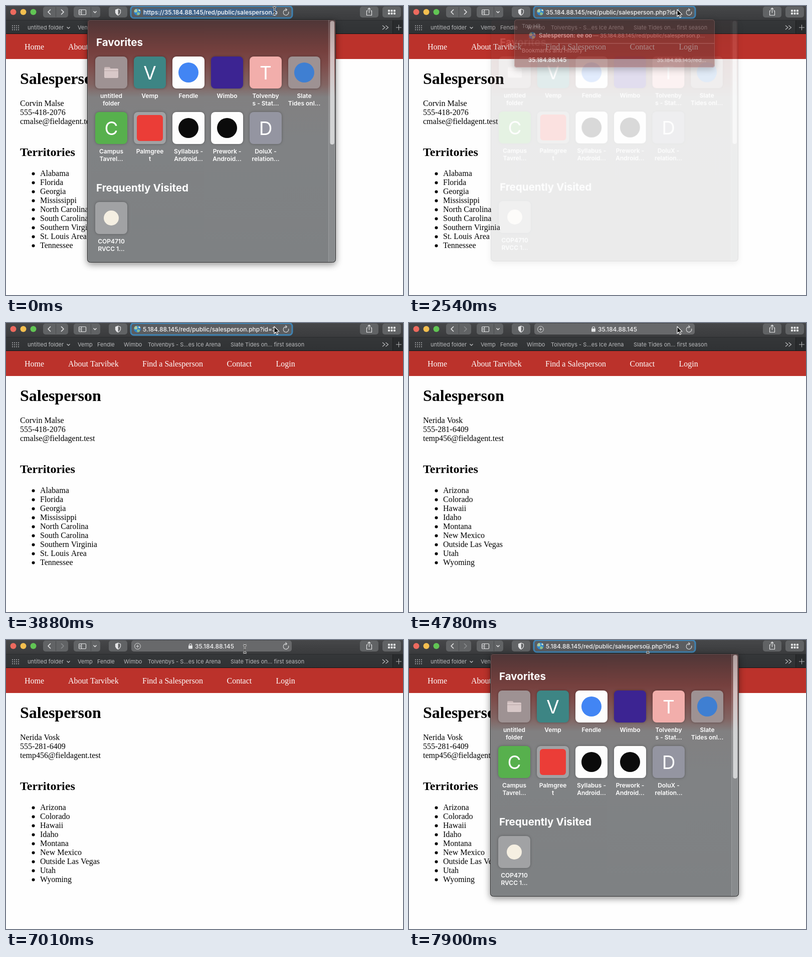
An HTML page with a canvas for the animation above (8 s loop, 792 by 578 pixels).

```html
<!DOCTYPE html>
<html lang="en">
<head>
<meta charset="utf-8">
<title>Salesperson</title>
<style>
html, body { margin: 0; width: 100%; height: 100%; overflow: hidden; background: #fefefe; }
canvas { display: block; }
</style>
</head>
<body>
<canvas id="stage" width="792" height="578"></canvas>
<script>
const W = 792, H = 578, LOOP = 8000;
const SANS = 'Inter, "Liberation Sans", sans-serif';
const SERIF = '"Liberation Serif", "Noto Serif", serif';
const screen = document.getElementById('stage').getContext('2d');
let g = screen;

// Value of the last [time, value] pair reached.
const at = (t, pairs) => pairs.reduce((v, p) => (t >= p[0] ? p[1] : v), pairs[0][1]);

function text(s, x, y, font, color, align = 'left') {
  g.font = font;
  g.fillStyle = color;
  g.textAlign = align;
  g.fillText(s, x, y);
}

const sans = (s, x, y, size, color, weight = 400, align) =>
  text(s, x, y, `${weight} ${size}px ${SANS}`, color, align);

const serif = (s, x, y, color = '#000', size = 16, weight = 400) =>
  text(s, x, y, `${weight} ${size}px ${SERIF}`, color);

function rect(x, y, w, h, color) {
  g.fillStyle = color;
  g.fillRect(x, y, w, h);
}

function box(x, y, w, h, r, fill, stroke, line = 1) {
  g.beginPath();
  g.roundRect(x, y, w, h, r);
  if (fill) { g.fillStyle = fill; g.fill(); }
  if (stroke) { g.strokeStyle = stroke; g.lineWidth = line; g.stroke(); }
}

function disc(x, y, r, color) {
  g.beginPath();
  g.arc(x, y, r, 0, 7);
  g.fillStyle = color;
  g.fill();
}

function path(points, color, line = 1.3, fill) {
  g.beginPath();
  points.forEach(([x, y], i) => (i ? g.lineTo(x, y) : g.moveTo(x, y)));
  if (fill) { g.closePath(); g.fillStyle = fill; g.fill(); }
  g.strokeStyle = color;
  g.lineWidth = line;
  g.stroke();
}

function fade(y0, y1, ...stops) {
  const f = g.createLinearGradient(0, y0, 0, y1);
  stops.forEach(([p, c]) => f.addColorStop(p, c));
  return f;
}

function layer(draw) {
  const c = document.createElement('canvas');
  c.width = W;
  c.height = H;
  g = c.getContext('2d');
  draw();
  g = screen;
  return c;
}

function shadowBox(x, y, w, h, r, fill) {
  g.save();
  g.shadowColor = 'rgba(0,0,0,.45)';
  g.shadowBlur = 14;
  g.shadowOffsetY = 4;
  box(x, y, w, h, r, fill);
  g.restore();
}

function globe(x, y, r) {
  g.save();
  g.beginPath();
  g.arc(x, y, r, 0, 7);
  g.clip();
  disc(x, y, r, '#2f86cf');
  disc(x - r * .45, y - r * .35, r * .5, '#a9c9a0');
  disc(x + r * .3, y + r * .5, r * .42, '#8dbb8c');
  disc(x + r * .6, y - r * .5, r * .3, '#c4dccb');
  g.restore();
}

function tile(col, y, color, lines, mark) {
  const x = 178 + 77 * col, cx = x + 32, cy = y + 32;
  g.save();
  g.shadowColor = 'rgba(0,0,0,.3)';
  g.shadowBlur = 5;
  box(x, y, 64, 64, 8, color);
  g.restore();
  if (typeof mark === 'string') sans(mark, cx, cy + 14, 37, '#fff', 400, 'center');
  else if (mark) mark(cx, cy);
  lines.forEach((s, i) => sans(s, cx, y + 83 + 15 * i, 12, '#fff', 600, 'center'));
}

function folder(x, y) {
  box(x - 14, y - 11, 12, 8, 2, '#c9b7b7');
  box(x - 14, y - 8, 28, 19, 2, '#d8c8c8');
  rect(x - 14, y - 4, 28, 1, '#b9a6a6');
}

const dot = (color, r = 20) => (x, y) => disc(x, y, r, color);

const favorites = layer(() => {
  shadowBox(162, 27, 496, 486, 6, '#808284');
  box(162, 27, 496, 486, 6, fade(27, 513,
    [0, '#4e3637'], [.07, '#643b3a'], [.13, '#75403e'], [.18, '#7d4a48'],
    [.27, '#826563'], [.32, '#818081'], [.5, '#808284'], [1, '#7e8183']));
  rect(643, 28, 14, 484, 'rgba(255,255,255,.08)');
  rect(643, 28, 1, 484, 'rgba(255,255,255,.16)');
  box(646.5, 30, 8.5, 247, 4, fade(30, 277, [0, '#b3a2a2'], [.3, '#d3bfbf'], [.6, '#d2d3d4'], [1, '#d4d5d6']));
  box(162.5, 27.5, 495, 485, 6, null, '#202122');
  box(163.5, 28.5, 493, 483, 5, null, 'rgba(255,255,255,.14)');

  sans('Favorites', 180, 80, 20.6, '#fff', 700);
  tile(0, 101, '#9e9293', ['untitled', 'folder'], folder);
  tile(1, 101, '#3d8584', ['Vemp'], 'V');
  tile(2, 101, '#fdfdfd', ['Fendle'], dot('#4285f4'));
  tile(3, 101, '#3c2492', ['Wimbo']);
  tile(4, 101, '#f2aeab', ['Tolvenby', 's - Stat...'], 'T');
  tile(5, 101, '#9e9293', ['Slate', 'Tides onl...'], dot('#3f7fd2'));
  tile(0, 212, '#57b04d', ['Campus', 'Tavrel...'], 'C');
  tile(1, 212, '#a1a2a4', ['Palmgree', 't'], (x, y) => box(x - 26, y - 26, 52, 52, 6, '#eb3d37'));
  tile(2, 212, '#fdfdfd', ['Syllabus -', 'Android...'], dot('#0b0b0b'));
  tile(3, 212, '#fdfdfd', ['Prework -', 'Android...'], dot('#0b0b0b'));
  tile(4, 212, '#9495a1', ['DoluX -', 'relation...'], 'D');
  sans('Frequently Visited', 180, 371, 20.6, '#fff', 700);
  tile(0, 392, '#a1a2a4', ['COP4710', 'RVCC 1...'], dot('#f5efe2', 15));
});

const hits = layer(() => {
  const pale = '#d0b7b6';
  shadowBox(210, 27, 400, 96, 5, '#703c3a');
  box(210, 27, 400, 96, 5, fade(27, 123, [0, '#593635'], [.35, '#6b3a38'], [1, '#803f3c']));
  box(210.5, 27.5, 399, 95, 5, null, '#a27270');
  rect(211, 74, 398, 1.5, '#a27c7a');
  sans('Top Hit', 225, 44, 11, pale);
  globe(246, 59, 7);
  sans('Salesperson: ee oo', 259, 63, 11.5, '#fff', 600);
  sans('— 35.184.88.145/red/public/salesperson.p...', 590, 63, 10.8, pale, 400, 'right');
  sans('Bookmarks and History', 225, 93, 11, pale);
  sans('35.184.88.145', 238, 112, 11.5, '#fff', 600);
  sans('35.184.88.145/red...', 593, 112, 10.8, pale, 400, 'right');
});

const people = [
  {
    info: ['Corvin Malse', '555-418-2076', 'cmalse@fieldagent.test'],
    areas: ['Alabama', 'Florida', 'Georgia', 'Mississippi', 'North Carolina',
      'South Carolina', 'Southern Virginia', 'St. Louis Area', 'Tennessee']
  },
  {
    info: ['Nerida Vosk', '555-281-6409', 'temp456@fieldagent.test'],
    areas: ['Arizona', 'Colorado', 'Hawaii', 'Idaho', 'Montana',
      'New Mexico', 'Outside Las Vegas', 'Utah', 'Wyoming']
  }
];

function page({ info, areas }) {
  rect(0, 56, W, H - 56, '#fefefe');
  rect(0, 56, W, 50, '#bb322b');
  [['Home', 37], ['About Tarvibek', 124], ['Find a Salesperson', 272], ['Contact', 440.5], ['Login', 538.5]]
    .forEach(([s, x]) => serif(s, x, 87, '#fff'));
  serif('Salesperson', 28, 156, '#000', 32, 700);
  info.forEach((s, i) => serif(s, 28, 200 + 18 * i));
  serif('Territories', 28, 300, '#000', 24, 700);
  areas.forEach((s, i) => {
    disc(54.5, 335.5 + 18 * i, 3, '#000');
    serif(s, 68, 340 + 18 * i);
  });
}

function chrome(canForward, loading) {
  const ink = '#e4e5e6', btn = '#616365';
  rect(0, 0, W, 28, fade(0, 28, [0, '#464749'], [1, '#3a3b3d']));
  rect(0, 28, W, 27, fade(28, 55, [0, '#353739'], [1, '#303234']));
  rect(0, 28, W, 1, '#2a2b2d');
  rect(0, 55, W, 1, '#151617');
  ['#ed6a5e', '#f4bf4f', '#61c554'].forEach((c, i) => disc(14.5 + 20 * i, 12, 6, c));

  [[74, 50], [135, 53], [205, 37], [706, 37], [751, 37]].forEach(([x, w]) => box(x, 1, w, 22, 5, btn));
  rect(99, 2, 1, 20, '#4a4c4e');
  rect(169, 2, 1, 20, '#4a4c4e');
  path([[89, 7], [84, 12], [89, 17]], ink, 1.6);
  path([[110, 7], [115, 12], [110, 17]], canForward ? ink : '#898b8d', 1.6);
  box(145.5, 7.5, 14, 10, 1.5, null, ink, 1.2);
  rect(150, 8, 1.2, 9, ink);
  [10, 12, 14].forEach(y => rect(147, y, 2, 1, ink));
  path([[174.5, 10.5], [177.5, 13.5], [180.5, 10.5]], ink, 1.5);

  // Shield, share and tab overview
  path([[223.5, 6], [228.5, 8], [228.5, 13], [226.5, 16.5], [223.5, 18.5], [220.5, 16.5], [218.5, 13], [218.5, 8], [223.5, 6]], ink, 1.2);
  path([[223.5, 6], [223.5, 18.5], [220.5, 16.5], [218.5, 13], [218.5, 8]], ink, .5, ink);
  const share = loading ? '#8c8e90' : ink;
  path([[722, 9.5], [719.5, 9.5], [719.5, 18.5], [729.5, 18.5], [729.5, 9.5], [727, 9.5]], share, 1.2);
  path([[724.5, 14], [724.5, 4.5]], share, 1.2);
  path([[721.5, 7], [724.5, 4], [727.5, 7]], share, 1.2);
  for (let i = 0; i < 6; i++) box(762 + 5.5 * (i % 3), i < 3 ? 7.5 : 13, 4, 4, 1, ink);

  const dim = '#b9babc';
  for (let i = 0; i < 12; i++) disc(13 + 4 * (i % 4), 39.5 + 4 * Math.floor(i / 4), 1, dim);
  [['untitled folder', 43], ['Vemp', 143], ['Fendle', 182], ['Wimbo', 235],
    ['Tolvenbys - S...es Ice Arena', 283], ['Slate Tides on... first season', 448]]
    .forEach(([s, x]) => sans(s, x, 47, 11, dim));
  path([[121.5, 42], [124.5, 45], [127.5, 42]], dim, 1.4);
  [751, 757.5].forEach(x => path([[x, 39], [x + 5, 43], [x, 47]], dim, 1.3));
  rect(771, 29, 21, 26, '#292b2d');
  rect(771, 29, 1, 26, '#1d1e1f');
  path([[778, 43], [789, 43]], dim, 1);
  path([[783.5, 37.5], [783.5, 48.5]], dim, 1);
}

function reload(loading) {
  if (loading) {
    path([[554.5, 8], [562.5, 16]], '#d8d9da');
    path([[562.5, 8], [554.5, 16]], '#d8d9da');
    return;
  }
  g.beginPath();
  g.arc(558.5, 13, 5.3, -.3, 4.9);
  g.strokeStyle = '#d8d9da';
  g.lineWidth = 1.2;
  g.stroke();
  path([[557.5, 4.8], [560.5, 7.6], [557.5, 10.2]], '#d8d9da', 1.2);
}

const HOST = '35.184.88.145', PATH = HOST + '/red/public/salesperson.';

function address(t, mode, hover, loading) {
  const ring = mode === 'plain' ? 0 : at(t, [[0, 1], [7160, 0], [7310, .6], [7460, 1]]);
  box(250, 1, 320, 22, 5, mode === 'plain' ? '#68696b' : '#5b5d60');
  if (ring) {
    g.globalAlpha = ring;
    box(249, 0.5, 322, 23.5, 6, null, '#3f83b3', 3);
    g.globalAlpha = 1;
  }
  reload(loading);
  if (mode === 'plain') {
    sans(HOST, 377, 17, 12, '#f2f2f3', 500);
    box(364, 11, 8, 6.5, 1, '#e4e5e6');
    box(365.5, 7.5, 5, 6, 2.5, null, '#e4e5e6', 1.2);
    if (hover) {
      g.beginPath();
      g.arc(262.5, 12.5, 6, 0, 7);
      g.strokeStyle = '#d8d9da';
      g.lineWidth = 1;
      g.stroke();
      path([[259.5, 12.5], [265.5, 12.5]], '#d8d9da', 1);
      path([[262.5, 9.5], [262.5, 15.5]], '#d8d9da', 1);
    }
    return;
  }
  globe(262, 12, 5 + 2 * ring);
  g.save();
  g.beginPath();
  g.rect(272, 2, 269, 20);
  g.clip();
  if (mode === 'all') {
    const x = at(t, [[0, 274], [7160, 283], [7310, 277], [7460, 274]]);
    rect(x - 1, 5, 541 - x, 15, '#41648b');
    sans('https://' + PATH + 'php?id=', x, 17, 12, '#fff', 500);
  } else {
    sans(`https://${PATH}php?id=${mode.slice(1)}`, mode === '=1' ? 537 : 538.5, 17, 12, '#f2f2f3', 500, 'right');
  }
  g.restore();
  const caret = at(t, [[0, 0], [300, 1], [1350, 0], [1800, 1], [3880, 0]]);
  if (caret) rect(537, 5, 1, 15, '#5fa8e0');
}

function arrow(x, y) {
  const shape = [[0, 0], [0, 14], [3.2, 11], [5.4, 16.2], [7.6, 15.2], [5.5, 10.2], [9.8, 10]];
  g.lineJoin = 'round';
  path(shape.map(([a, b]) => [x + a, y + b]).concat([[x, y]]), '#fff', 1.1, '#000');
}

function ibeam(x, y) {
  const stem = [[x, y - 6], [x, y + 6]];
  const ends = [-1, 1].map(s => [[x - 3.5, y + 8 * s], [x - 1, y + 7.5 * s], [x, y + 6 * s], [x + 1, y + 7.5 * s], [x + 3.5, y + 8 * s]]);
  [['#fff', 3], ['#000', 1.2]].forEach(([c, w]) => [stem, ...ends].forEach(p => path(p, c, w)));
  path([[x - 2, y + 2], [x + 2, y + 2]], '#000', 1);
}

// The pointer swings down to the page and back in eight steps.
function pointer(t) {
  const start = [535, 7], low = [590, 260], end = [476.5, 18];
  if (t < 5830) return start;
  const k = Math.min(8, Math.floor((t - 5830) / 148.5) + 1);
  const [a, b, u] = k <= 4 ? [start, low, k / 4] : [low, end, (k - 4) / 4];
  const e = u * u * (3 - 2 * u);
  return [a[0] + (b[0] - a[0]) * e, a[1] + (b[1] - a[1]) * e];
}

function overlay(img, alpha, scale = 1) {
  if (!alpha) return;
  g.save();
  g.globalAlpha = alpha;
  g.translate(410, 27);
  g.scale(scale, scale);
  g.drawImage(img, -410, -27);
  g.restore();
}

function draw(t) {
  const second = t >= 4480;
  const loading = t >= 4330 && t < 4780;
  const mode = at(t, [[0, 'all'], [150, '=1'], [2390, '='], [3140, '=3'], [4330, 'plain'], [7160, 'all'], [7900, '=3']]);
  const [x, y] = pointer(t);

  page(people[second ? 1 : 0]);
  chrome(!second, loading);
  address(t, mode, y < 24, loading);
  const shown = at(t, [[0, 1], [2390, .6], [2540, .15], [2690, 0], [7160, .71], [7310, .93], [7460, 1]]);
  overlay(favorites, shown, shown < 1 ? .995 : 1);
  overlay(hits, at(t, [[0, 0], [2540, .5], [2690, 1], [3140, .7], [3290, .3], [3430, 0]]));

  if (t < 300) ibeam(535.5, 9.5);
  else if (t >= 6870) ibeam(476.5, 18);
  else arrow(x, y);
}

function tick() {
  draw(performance.now() % LOOP);
  requestAnimationFrame(tick);
}
tick();
</script>
</body>
</html>
```
